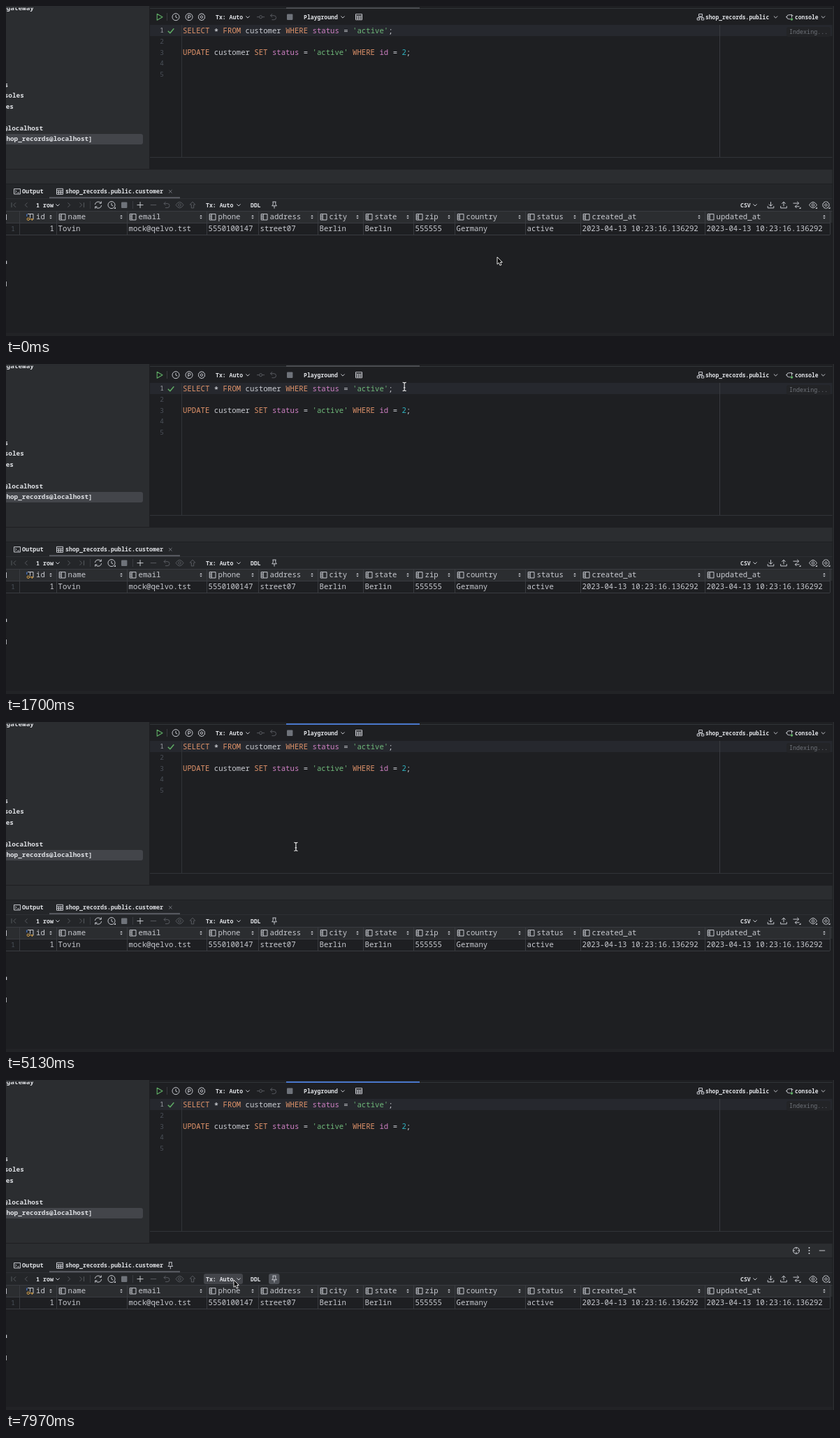
Write an HTML page that moves like this. It is 1185 px wide and 472 px high and loops after 8000 ms.

```html
<!DOCTYPE html>
<html lang="en">
<head>
<meta charset="utf-8">
<title>Query console</title>
<style>
html, body { margin: 0; width: 100%; height: 100%; overflow: hidden; background: #1e1f22; }
svg { display: block; width: 1185px; height: 472px; }
text { font-family: "Noto Sans Mono", "DejaVu Sans Mono", monospace; font-weight: 500; white-space: pre; }
</style>
</head>
<body>
<svg id="stage" viewBox="0 0 1185 472" xmlns="http://www.w3.org/2000/svg"></svg>
<script>
const LOOP = 8000;
const C = {
  editor: '#1e1f22', panel: '#2b2d30', line: '#393b40', text: '#c8cad0', bright: '#dfe1e5',
  icon: '#ced0d6', dim: '#5a5d63', keyword: '#e0936a', column: '#cf80c4', string: '#6fb97a',
  number: '#2fb3c0', green: '#5fad65', blue: '#4a78cc'
};
const stage = document.getElementById('stage');

// Markup helpers
const rect = (x, y, w, h, fill, extra = '') =>
  `<rect x="${x}" y="${y}" width="${w}" height="${h}" fill="${fill}" ${extra}/>`;
const text = (x, y, body, size = 10.67, fill = C.text, extra = '') =>
  `<text x="${x}" y="${y}" font-size="${size}" fill="${fill}" ${extra}>${body}</text>`;
const label = (x, y, body, size = 8.15) => text(x, y, body, size, C.bright, 'font-weight="700" style="font-weight:700"');
const span = (fill, body) => `<tspan fill="${fill}">${body}</tspan>`;
const group = (id, body, extra = '') => `<g id="${id}" ${extra}>${body}</g>`;

// Icon outlines, each centred on 0,0
const shapes = {
  run: 'M-3.3-4.5L4.5 0L-3.3 4.5Z',
  down: 'M-2.6-1.2L0 1.4L2.6-1.2',
  left: 'M1.5-3.2L-1.7 0L1.5 3.2',
  right: 'M-1.5-3.2L1.7 0L-1.5 3.2',
  first: 'M3-3.2L-.2 0L3 3.2M-3-3.5V3.5',
  last: 'M-3-3.2L.2 0L-3 3.2M3-3.5V3.5',
  circle: 'M-5 0A5 5 0 1 1 5 0A5 5 0 1 1-5 0',
  hands: 'M0-2.8V.3L2.3 1.4',
  letterP: 'M-1.2 2.7V-2.5H.5A1.5 1.5 0 0 1 .5.7H-1.2',
  gear: 'M-2.5-4.3L-1-4.3L0-5.1L1-4.3L2.5-4.3L3.2-2.7L4.8-1.6L4.2 0L4.8 1.6L3.2 2.7L2.5 4.3L1 4.3L0 5.1L-1 4.3L-2.5 4.3L-3.2 2.7L-4.8 1.6L-4.2 0L-4.8-1.6L-3.2-2.7ZM-1.7 0A1.7 1.7 0 1 1 1.7 0A1.7 1.7 0 1 1-1.7 0',
  commit: 'M-5.5 0H-2M2 0H5.5M-2 0A2 2 0 1 1 2 0A2 2 0 1 1-2 0',
  undo: 'M-1.5-4.5L-4-2L-1.5.5M-4-2H1A3 3 0 0 1 1 4H-2',
  table: 'M-4.5-4H4.5V4H-4.5ZM-4.5-1.3H4.5M-4.5 1.4H4.5M-1.5-1.3V4M1.5-1.3V4',
  schema: 'M-2.5-4.2H2.5V-.8H-2.5ZM-4.8 1.3H-1.4V4.3H-4.8ZM1.4 1.3H4.8V4.3H1.4ZM0-.8V.5M-3.1 1.3V.3H3.1V1.3',
  plug: 'M3-3H-1A3 3 0 0 0-1 3H1M-5.5 0H-4M3-3.8V1M3-2H5',
  terminal: 'M-4.5-3.7H4.5V3.7H-4.5ZM-2.8-1.6L-1 0L-2.8 1.6M.4 1.8H2.8',
  close: 'M-2.2-2.2L2.2 2.2M2.2-2.2L-2.2 2.2',
  refresh: 'M-4.7-.5A4.8 4.8 0 0 1 3.9-2.7M4.7.5A4.8 4.8 0 0 1-3.9 2.7M4.3-5.2V-2.4H1.5M-4.3 5.2V2.4H-1.5',
  plus: 'M-4.5 0H4.5M0-4.5V4.5',
  minus: 'M-4.2 0H4.2',
  eye: 'M-5.5 0Q0-8.5 5.5 0Q0 8.5-5.5 0M-1.8 0A1.8 1.8 0 1 1 1.8 0A1.8 1.8 0 1 1-1.8 0',
  up: 'M-3.8-.5L0-4.5L3.8-.5H1.7V4.3H-1.7V-.5Z',
  pin: 'M-2.5-4.5H2.5M-1.8-4.5V-.8L-3.3 1.2H3.3L1.8-.8V-4.5M0 1.2V5',
  download: 'M0-4.5V1.5M-2.7-1L0 1.7L2.7-1M-4.3 1.5V4.3H4.3V1.5',
  upload: 'M0 1.8V-4.3M-2.7-1.8L0-4.5L2.7-1.8M-4.3 1.5V4.3H4.3V1.5',
  compare: 'M-5-2.5H3M.8-4.8L3.2-2.5L.8-.2M4 2.2H-2M0 .2L-2.2 2.2L0 4.4',
  corner: 'M5.5 2.8V5.5H2.8Z',
  target: 'M-4.5 0A4.5 4.5 0 1 1 4.5 0A4.5 4.5 0 1 1-4.5 0M0-4.8V-2M0 4.8V2M-4.8 0H-2M4.8 0H2',
  field: 'M-4.3-4.2H4.5V4.2H-4.3ZM-1.3-4.2V4.2M-4.3-1.4H-1.3M-4.3 1.4H-1.3',
  sort: 'M-1.5-.9L0-2.7L1.5-.9ZM-1.5.9L0 2.7L1.5.9Z',
  check: 'M-4.2.3L-1.2 3.2L4.3-3.2'
};
const icon = (name, x, y, color = C.icon, width = 0.95, fill = 'none') =>
  `<path d="${shapes[name]}" transform="translate(${x} ${y})" fill="${fill}" stroke="${color}" stroke-width="${width}" stroke-linejoin="round"/>`;
const icons = (y, color, list) => list.map(([name, x]) => icon(name, x, y, color)).join('');

function sidebar() {
  const rows = [[0.6, 5.8, 'gateway'], [-2.5, 115.5, 's'], [-2.3, 131, 'soles'], [-0.3, 146.5, 'es'],
    [-3, 177.8, '@localhost'], [0.4, 193.4, 'hop_records@localhost]']];
  return rect(0, 0, 205, 233, C.panel) + rect(-5, 183, 201, 15, '#43454a', 'rx="3"') +
    rows.map(([x, y, body]) => text(x, y, body, 9.35, C.bright, 'style="font-weight:600"')).join('') +
    rect(0, 0, 205, 2.5, C.panel) + rect(205, 0, 1, 233, C.editor);
}

function editorToolbar() {
  const y = 15.7;
  return rect(206, 3, 977, 1, '#313438') +
    icon('run', 219.5, y, C.green, 1.1) + rect(230, 10, 1, 11, C.line) +
    icons(y, C.icon, [['circle', 243], ['hands', 243], ['circle', 262], ['letterP', 262], ['gear', 280],
      ['down', 346], ['down', 482], ['table', 505], ['schema', 994], ['down', 1101.5], ['plug', 1121.5], ['down', 1169.5]]) +
    icons(y, C.dim, [['commit', 364.5], ['undo', 382.5]]) + rect(402, 11.5, 8.4, 8.4, '#6f737a', 'rx="1"') +
    label(300, 18.6, 'Tx: Auto') + label(426, 18.6, 'Playground') +
    label(1001, 18.6, 'shop_records.public', 8) + label(1129, 18.6, 'console', 8) +
    `<circle cx="1124.5" cy="19" r="1.8" fill="${C.green}"/>`;
}

function editor() {
  const k = s => span(C.keyword, s), c = s => span(C.column, s), s = v => span(C.string, v);
  const star = '<tspan dy="1.6" font-weight="700">*</tspan><tspan dy="-1.6"> </tspan>';
  const numbers = [1, 2, 3, 4, 5].map(n =>
    text(226, 38.3 + 15.65 * (n - 1), n, 9.4, n === 1 ? '#a1a3ab' : '#4b5059', 'text-anchor="end"')).join('');
  return rect(206, 27, 977, 16, '#26282e') + rect(251, 27, 1, 189, '#313438') +
    rect(1021, 27, 1, 189, '#393b40') + rect(206, 216, 977, 1, '#313438') +
    rect(253, 27.5, 295, 15, '#2f5942', 'id="highlight"') + numbers +
    group('check', icon('check', 236, 35.5, C.green, 1.5)) +
    text(253, 38.5, `${k('SELECT')} ${star}${k('FROM')} customer ${k('WHERE')} ${c('status')} = ${s("'active'")};`) +
    text(253, 69.8, `${k('UPDATE')} customer ${k('SET')} ${c('status')} = ${s("'active'")} ${k('WHERE')} ${c('id')} = ${span(C.number, 2)};`) +
    rect(1117, 30, 63, 14, '#232427', 'rx="3"') + text(1121, 40, 'Indexing...', 8.4, '#6f737a') +
    rect(1173, 46, 10, 1.2, C.green, 'id="marker"') +
    rect(553, 29, 1.4, 13, '#ced0d6', 'id="caret"') + rect(401, 2, 191, 2, C.blue, 'id="focusBar"');
}

function resultPanel() {
  const y = 284.6;
  return rect(0, 233, 1185, 21.5, C.panel) + rect(0, 233, 1185, 1, C.editor) +
    rect(0, 254, 1185, 39, '#242629') + rect(0, 254, 1185, 1, '#1e1f22') + rect(0, 275, 1185, 1, '#2d2f33') +
    group('headerIcons', icons(244, C.icon, [['target', 1131], ['minus', 1168]]) +
      [-4, 0, 4].map(d => `<circle cx="1149.5" cy="${244 + d}" r="1" fill="${C.icon}"/>`).join('')) +
    icon('terminal', 16, 265.3) + label(23, 268.3, 'Output', 8.5) +
    icon('table', 77, 265.3) + label(85, 268.3, 'shop_records.public.customer', 8.33) +
    group('tabClose', icon('close', 235.3, 265.3, '#868a91', 0.8)) + group('tabPin', icon('pin', 235.3, 265.3)) +
    rect(62, 273.2, 187, 2, '#5a5d63') +
    rect(283, 277, 56, 15, '#43454a', 'id="txHover" rx="3"') + rect(376, 277, 15.5, 15, '#43454a', 'id="pinHover" rx="3"') +
    icons(y, C.dim, [['first', 11], ['left', 29], ['right', 90], ['last', 108.5], ['minus', 211], ['undo', 230], ['eye', 248.5], ['up', 267]]) +
    icons(y, C.icon, [['down', 74], ['refresh', 132], ['circle', 151], ['hands', 151], ['plus', 192], ['down', 333], ['pin', 384],
      ['down', 1072], ['download', 1094.5], ['upload', 1113], ['compare', 1131.5], ['eye', 1155], ['gear', 1173.5]]) +
    [151.5, 1132, 1155.5, 1174].map(x => icon('corner', x, y, C.icon, 0, C.icon)).join('') +
    rect(165, 280.5, 8.4, 8.4, '#6f737a', 'rx="1"') + rect(120, 279, 1, 11, C.line) + rect(181, 279, 1, 11, C.line) +
    label(43, 287.6, '1 row', 8.4) + label(286, 287.6, 'Tx: Auto', 8.2) + label(350, 287.6, 'DDL') + label(1051, 287.6, 'CSV');
}

function grid() {
  const stamp = '2023-04-13 10:23:16.136292';
  const columns = [[72, 'name', 'Tovin'], [173, 'email', 'mock@qelvo.tst'], [287, 'phone', '5550100147'],
    [361, 'address', 'street07'], [446, 'city', 'Berlin'], [511, 'state', 'Berlin'], [583, 'zip', '555555'],
    [642, 'country', 'Germany'], [743, 'status', 'active'], [822, 'created_at', stamp], [1000, 'updated_at', stamp], [1179]];
  const cells = columns.map(([x, name, value]) => rect(x, 293, 1, 34, C.line) + icon('sort', x - 8, 301.8, C.icon, 0.2, C.icon) +
    (name ? icon('field', x + 8.5, 301.8) + text(x + 16.5, 305.2, name) + text(x + 2.5, 322.2, value) : '')).join('');
  const key = `<path d="M31 297.5H39V305.5M34.5 297.5V303" fill="none" stroke="${C.icon}" stroke-width=".95"/>
    <path d="M29.8 297.5V301" stroke="${C.blue}" stroke-width="1.2"/>
    <path d="M33.5 304.8H39M37.3 304.8V307" stroke="#e0a84a" stroke-width="1.1" fill="none"/>
    <circle cx="31.8" cy="304.8" r="1.7" fill="none" stroke="#e0a84a"/>`;
  return rect(0, 293, 1183, 17, C.panel) + rect(0, 293, 1183, 1, C.line) + rect(0, 310, 1179, 1, C.line) + rect(0, 327, 1179, 1, C.line) +
    rect(19, 293, 1, 34, C.line) + cells + key +
    text(43, 305.2, 'id') + text(69, 322.2, '1', 10.67, C.text, 'text-anchor="end"') + text(7, 322.2, '1', 9.8, '#4b5059') +
    rect(0, 298, 0.9, 8, C.icon) + rect(0, 364.5, 1.2, 4.5, C.icon) + rect(0, 394, 0.8, 7, C.icon) +
    rect(0, 467.5, 1185, 4.5, '#222326') + rect(1183, 0, 2, 472, C.panel) + rect(1182.6, 0, 0.7, 472, '#18191b');
}

function overlays() {
  const popup = rect(551, 44, 309, 75, C.panel, 'rx="7" stroke="#43454a" stroke-width=".8"') +
    rect(556, 70, 299, 20, '#2e436e', 'rx="4"') + label(563, 61, 'Choose Statement', 8.5) +
    text(563, 83.2, "SELECT * FROM customer WHERE status = 'active'", 9.3) +
    text(563, 105.5, "SELECT * FROM customer WHERE status = 'act...", 9.3);
  return group('popup', popup) +
    rect(551.5, 40, 308, 79, 'none', 'id="ghost" rx="8" stroke="#1a1b1e" stroke-width="1.2"') +
    group('tooltip', rect(380, 295, 59, 16, '#393b40', 'rx="3" stroke="#4e5157" stroke-width=".7"') + label(391, 305.8, 'Pin Tab', 8.2)) +
    group('arrow', `<path d="M0 0V10.3L2.4 8.2L4 12L6 11.1L4.4 7.5H7.3Z" fill="#000" stroke="#fff" stroke-width=".9"/>`) +
    group('beam', `<path d="M-2.5-6Q0-6 0-4.5Q0-6 2.5-6M0-4.5V4.5M-2.5 6Q0 6 0 4.5Q0 6 2.5 6M-1.3 1.5H1.3" fill="none" stroke="#e8e8e8" stroke-width="1.1"/>`);
}

stage.innerHTML = rect(0, 0, 1185, 472, C.editor) + sidebar() + editorToolbar() + editor() + resultPanel() + grid() + overlays();
const el = id => document.getElementById(id);
const show = (id, on) => el(id).setAttribute('opacity', Number(on));
const place = (id, x, y) => el(id).setAttribute('transform', `translate(${x.toFixed(2)} ${y.toFixed(2)})`);

const within = (t, from, to) => t >= from && t < to;
const ramp = (t, from, to) => Math.min(1, Math.max(0, (t - from) / (to - from)));
const smooth = p => p * p * (3 - 2 * p);
const easeOut = p => 1 - (1 - p) ** 2;
const linear = p => p;

// Pointer moves: start, end, destination, easing
const moves = [
  [0, 700, 420, 115, smooth], [930, 1070, 425, 103, linear], [1070, 1730, 571, 32, smooth], [1770, 1830, 573, 32, linear],
  [4900, 5130, 415, 178, linear], [5130, 5700, 383, 275, easeOut], [5830, 5930, 383, 279, smooth], [7570, 7970, 326, 286, smooth]
];
function pointerAt(t) {
  let x = 703, y = 359;
  for (const [from, to, toX, toY, ease] of moves) {
    const p = ease(ramp(t, from, to));
    x += (toX - x) * p;
    y += (toY - y) * p;
  }
  return [x, y];
}

function caretOn(t) {
  if (t < 4230) return within(t, 2000, 2470) || within(t, 2970, 3130);
  return t < 4930 || Math.floor((t - 4930) / 495) % 2 === 1;
}

function draw(t) {
  const [x, y] = pointerAt(t);
  const hidden = within(t, 2970, 4900);
  const beam = !hidden && y < 216 && (within(t, 1200, 2970) || t >= 4900);
  place('arrow', x, y);
  place('beam', x, y);
  show('arrow', !hidden && !beam);
  show('beam', beam);

  const focused = within(t, 2000, 3170) || t >= 3960;
  el('focusBar').setAttribute('fill', focused ? C.blue : '#4b4d51');
  show('caret', caretOn(t));
  show('highlight', within(t, 3130, 3960));
  show('marker', within(t, 3130, 3960));
  show('popup', t < 3500 ? ramp(t, 3070, 3270) : t < 3830);
  show('ghost', within(t, 3830, 3930) ? 0.7 : 0);
  show('check', !within(t, 4000, 4230));

  show('headerIcons', t >= 30 && y > 233 && y < 345 && !hidden);
  const pinned = t >= 6700;
  show('pinHover', pinned || (t > 5600 && y > 268));
  el('pinHover').setAttribute('fill', pinned ? '#4e5157' : '#393b40');
  show('tooltip', t < 6600 ? ramp(t, 6270, 6470) : 1 - ramp(t, 6690, 6740));
  show('tabPin', t >= 6930);
  show('tabClose', t < 6930);
  show('txHover', t > 7570 && x < 339);
}

const start = performance.now();
function tick(now) {
  draw(Math.max(0, now - start) % LOOP);
  requestAnimationFrame(tick);
}
draw(0);
requestAnimationFrame(tick);
</script>
</body>
</html>
```
